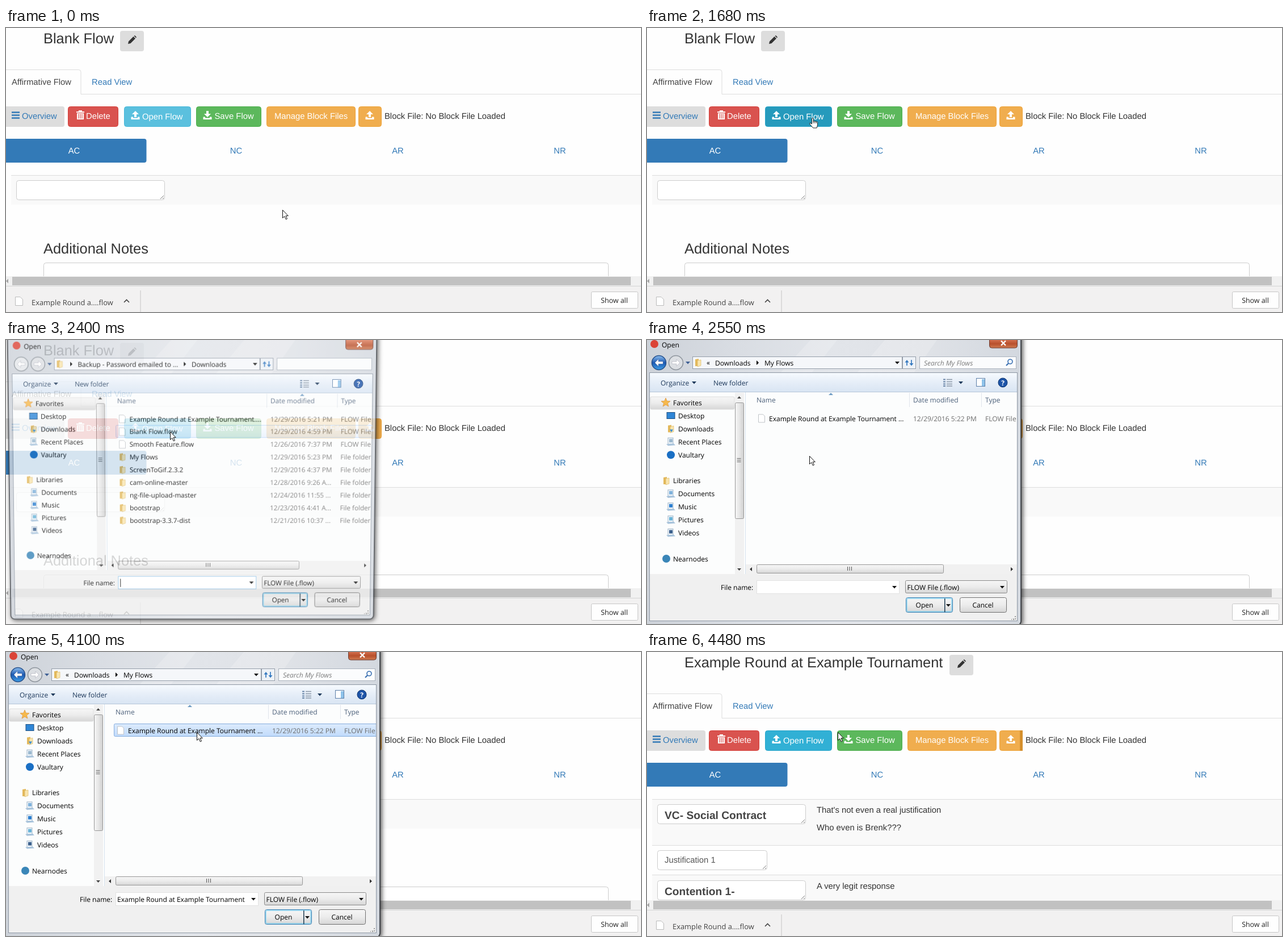
Recreate the animation shown at these times as an HTML page. Size 1119 px wide and 500 px high, loop 6.58 s.

```html
<!DOCTYPE html>
<html lang="en">
<head>
<meta charset="utf-8">
<title>Open Flow</title>
<style>
html, body { margin: 0; width: 100%; height: 100%; overflow: hidden; background: #fefefe; }
svg { position: absolute; left: 0; top: 0; overflow: visible; text-rendering: geometricPrecision; }
.page text { font-family: "Liberation Sans", Arial, sans-serif; font-size: 14.8px; }
.page .bar text, #dialog text { font-family: "Open Sans", "Noto Sans", sans-serif; }
#dialog text { font-size: 12px; }
#dialog { transform-origin: 329.5px 250px; filter: drop-shadow(2px 2px 4px rgba(0,0,0,.75)); }
</style>
</head>
<body>
<svg class="page" id="page" width="1119" height="500"></svg>
<svg id="dialog" width="1119" height="500"></svg>
<svg id="pointer" width="1119" height="500">
  <g id="cursor" stroke="#111" stroke-linejoin="round" fill="#fff">
    <path id="arrow" d="M0 0V14L3.3 11L5.8 16.4L8 15.4L5.6 10.2H9.8Z"/>
    <path id="hand" transform="scale(.92)" d="M1 1.5a1.5 1.5 0 0 1 3 0V7a1.4 1.4 0 0 1 2.8.3a1.4 1.4 0 0 1 2.8.5a1.3 1.3 0 0 1 2.4 1v4.5L10.5 19H3.5L-2.5 12q-1.5-2.8.8-2.7L1 11.5ZM4 7v3M6.8 7.5v2.5M9.6 8v2"/>
  </g>
</svg>
<script>
const LOOP = 6580;
const $ = id => document.getElementById(id);
const rect = (x, y, w, h, fill, more = '') =>
  `<rect x="${x}" y="${y}" width="${w}" height="${h}" fill="${fill}" ${more}/>`;
const path = (d, fill, more = '') => `<path d="${d}" fill="${fill}" ${more}/>`;
const line = (d, color, w = 1, more = '') =>
  path(d, 'none', `stroke="${color}" stroke-width="${w}" ${more}`);
const text = (x, y, s, fill = '#333', more = '') =>
  `<text x="${x}" y="${y}" fill="${fill}" ${more}>${s}</text>`;
const mid = 'text-anchor="middle"';
const at = (x, y, s) => `<g transform="translate(${x} ${y})">${s}</g>`;
const group = (id, s, more = '') => `<g id="${id}" ${more}>${s}</g>`;
const grad = (id, colors, dir = 'x2="0" y2="1"') =>
  `<linearGradient id="${id}" ${dir}>` + colors.map((c, i) =>
    `<stop offset="${i / (colors.length - 1)}" stop-color="${c}"/>`).join('') + '</linearGradient>';
const down = (x, y, c = '#111') => path(`M${x - 4} ${y - 2}h8l-4 4.5z`, c);

// ---------- web page ----------
const BLUE = '#337ab7';
const button = (x, w, fill, edge, id = '') =>
  rect(x + .5, 138.5, w - 1, 35, fill, `rx="4" stroke="${edge}" ${id && `id="${id}"`}`);
const tray = 'M-7.5 2.5H-4V4.5H4V2.5H7.5V7H-7.5Z';
const upload = (x, y) => at(x, y, path('M0-8L6-2H2V3H-2V-2H-6Z' + tray, '#fff'));
const download = (x, y) => at(x, y, path('M-2-8H2V-3H6L0 3L-6-3H-2Z' + tray, '#fff'));
const area = (x, y, w) => rect(x + .5, y + .5, w, 34, '#fff', 'rx="4" stroke="#ccc"') +
  line(`M${x + w - 7} ${y + 33}l6-6M${x + w - 3} ${y + 33}l2-2`, '#777');
const stripe = (y, h, fill) => rect(9, y, 1110, h, fill) + rect(9, y, 1110, 1, '#ddd');
const pencil = path('M-7 7L-6 2.5L2.5-6L6-2.5L-2.5 6ZM3.5-7L5-8L8-5L7-3.5Z', '#333');
const trash = path('M-7-6H-3V-8H3V-6H7V-4H-7ZM-6-3H6V8H-6Z', '#fff') +
  line('M-3-2V6.5M0-2V6.5M3-2V6.5', '#d9534f', 1.2);
const heading = 'style="font-size:25.4px"';
const bold = 'style="font-size:19.2px;font-weight:bold"';

const emptyFlow = stripe(259, 52, '#f9f9f9') + area(18, 268, 261) +
  text(66, 397, 'Additional Notes', '#333', heading) +
  rect(66.5, 413.5, 995, 60, '#fff', 'rx="4" stroke="#ccc"');
const loadedFlow = stripe(259, 81, '#f9f9f9') + stripe(340, 52, '#fefefe') + stripe(392, 60, '#f9f9f9') +
  area(18, 268, 261) + area(18, 349, 193) + area(18, 402, 261) +
  text(31, 294, 'VC- Social Contract', '#444', bold) +
  text(31, 371, 'Justification 1', '#555') +
  text(31, 428, 'Contention 1-', '#444', bold) +
  text(299, 283, "That's not even a real justification") +
  text(299, 314, 'Who even is Brenk???') +
  text(299, 417, 'A very legit response') +
  rect(657, 138, 5, 36, '#d58f2c');

$('page').innerHTML =
  text(66, 27, '', '#333', heading + ' id="title"') +
  group('edit', rect(201, 5, 42, 36, '#ddd', 'rx="4"') + at(222, 21, pencil)) +
  line('M-5 73.5H128a4 4 0 0 1 4 4V116.5H1119', '#ddd') +
  text(10, 100, 'Affirmative Flow', '#444') + text(151, 100, 'Read View', BLUE) +
  rect(-6, 138, 109, 36, '#ddd', 'rx="4"') +
  line('M10 148.5H24M10 153.5H24M10 158.5H24', BLUE, 2.4) + text(28, 160, 'Overview', BLUE) +
  button(109, 89, '#d9534f', '#d43f3a') + at(131, 153, trash) + text(141, 160, 'Delete', '#fff') +
  button(208, 118, '#5bc0de', '#46b8da', 'openFlow') + upload(228, 154) + text(240, 161, 'Open Flow', '#fff') +
  button(335, 115, '#5cb85c', '#4cae4c') + download(355, 154) + text(367.5, 160, 'Save Flow', '#fff') +
  button(459, 157, '#f0ad4e', '#eea236') + text(473, 160, 'Manage Block Files', '#fff') +
  button(621, 41, '#f0ad4e', '#eea236') + upload(641, 154) +
  text(667, 160, 'Block File: No Block File Loaded') +
  rect(-6, 195, 253.5, 42, BLUE, 'rx="4"') +
  rect(278, 195, 255, 42, '#eee', 'rx="4" id="ncHover"') +
  [['AC', 120, '#fff'], ['NC', 405.5, BLUE], ['AR', 690.5, BLUE], ['NR', 976, BLUE]]
    .map(([s, x, c]) => text(x, 221, s, c, mid + ` id="tab${s}"`)).join('') +
  group('empty', emptyFlow) + group('loaded', loadedFlow) +
  rect(0, 437, 1119, 17, '#f1f1f1') + rect(11, 438, 1090, 15, '#c1c1c1') +
  path('M0 445.5L4 441.5V449.5Z', '#a3a3a3') +
  rect(0, 454, 1119, 46, '#f2f1f1') + rect(0, 454, 1119, 1, '#d4d4d4') +
  path('M16.5 473.5H25L29.5 478V488.5H16.5Z', '#fff', 'stroke="#bbb"') +
  line('M208 483L212.5 478.5L217 483', '#444', 1.6) + rect(236.5, 462, 1, 38, '#c4c4c4') +
  rect(1031.5, 464.5, 82, 29, '#fefefe', 'rx="2" stroke="#c6c6c6"') +
  group('', text(45, 488, 'Example Round a....flow', '#444', 'style="font-size:12.9px"') +
    text(1072, 484, 'Show all', '#222', mid + ' style="font-size:12.4px"'), 'class="bar"');

// ---------- file dialog ----------
const INK = '#000', HEAD = '#4c607a', TOOL = '#1e395b';
const sheet = (x, y) => at(x, y, path('M-5.5-7H2.5L5.5-4V7H-5.5Z', '#fff', 'stroke="#c0c4c8"'));
const folder = (x, y) => at(x, y,
  path('M-5-6L1-7V6H-5Z', '#e3b95c') + path('M-1-4L5-5V5L-1 7Z', '#f9e5ae', 'stroke="#d9b45c" stroke-width=".6"'));
const place = (x, y, c) => at(x, y, rect(-5, -7, 9, 11, '#f4f8fc', 'stroke="#9db4c8"') +
  rect(-3, -5, 6, 6, c) + path('M-8 4L5 3L8 6L-5 7Z', '#a9c4dc'));
const dot = (x, y, c) => `<circle cx="${x}" cy="${y}" r="7" fill="${c}"/>`;
const star = path('M0-8L2.2-2.6L8-2.2L3.5 1.5L5 7L0 4L-5 7L-3.5 1.5L-8-2.2L-2.2-2.6Z', '#f6b94c', 'stroke="#d8903a" stroke-width=".7"');

const round = (x, fill, edge, flip) => at(x, 40,
  `<circle r="12.5" fill="${fill}" stroke="${edge}" stroke-width="1.5"/>` +
  path('M-7 0L-1-6V-2H7V2H-1V6Z', '#fff', `transform="scale(${flip} 1)" stroke="#99a" stroke-width=".5"`));
const crumb = x => path(`M${x} 36l4 4l-4 4z`, INK);
const thumb = (x, y, w, h, fill) => rect(x + .5, y + .5, w, h, `url(#${fill})`, 'rx="2" stroke="#979797"');

const sideItems = [['Desktop', '#2f86d6'], ['Downloads', '#3f8fd0'], ['Recent Places', '#9ab8cf'], ['Vaultary', 0],
  0, 0, ['Documents', '#7fb2dc'], ['Music', '#2c7fd0'], ['Pictures', '#69b4d8'], ['Videos', '#3a5f8c']];
const sidebar = rect(6, 100, 148, 22, 'url(#soft)', 'rx="2" stroke="#dcdcdc"') +
  at(33, 110, star) + text(46, 115, 'Favorites', INK) +
  sideItems.map((it, i) => {
    if (!it) return '';
    const y = 133.5 + i * 22.9;
    const icon = i == 0 ? rect(35, y - 6, 14, 11, it[1], 'stroke="#1d4f80"')
      : i == 1 ? folder(42, y) + path(`M40 ${y + 1}h6l-3 5z`, it[1])
      : i == 3 ? dot(42, y, '#1a6fc4') : place(42, y, it[1]);
    return icon + text(55, y + 4.5, it[0], INK);
  }).join('') +
  folder(34, 248) + text(46, 252, 'Libraries', INK) + dot(34, 385, '#3a86b8') + text(46, 389.5, 'Nearnodes', INK);
const sideBar = rect(155, 93, 16, 319, '#f1f1f1') + thumb(155, 110, 15, 204, 'across') +
  path('M159 103h7l-3.5-4zM159 402h7l-3.5 4z', '#444') + line('M158.5 208.5h7M158.5 211.5h7M158.5 214.5h7', '#666') +
  rect(173, 92, 1, 320, '#d6e2ee');

const listHead = sortX => text(193, 110, 'Name', HEAD) + text(469, 110, 'Date modified', HEAD) +
  text(596, 110, 'Type', HEAD) + rect(462, 93, 1, 25, '#dfe5ec') + rect(589, 93, 1, 25, '#dfe5ec') +
  path(`M${sortX - 4} 97l4-4l4 4z`, '#6f9cc4');
const rowMark = (y, more) => rect(190.5, y - 11.5, 470, 22, 'url(#over)', 'rx="2" clip-path="url(#list)" stroke="#b8d6fb" ' + more);
const fileRow = (i, name, date, type) => {
  const y = 138 + i * 22.95;
  return (type == 'FLOW File' ? sheet : folder)(202, y) + text(215, y + 4.5, name, INK) +
    text(469, y + 4.5, date, '#6d6d6d') + text(596, y + 4.5, type, '#6d6d6d');
};
const downloads = [
  ['Example Round at Example Tournament....', '12/29/2016 5:21 PM'], ['Blank Flow.flow', '12/29/2016 4:59 PM'],
  ['Smooth Feature.flow', '12/26/2016 7:37 PM'], ['My Flows', '12/29/2016 5:23 PM'],
  ['ScreenToGif.2.3.2', '12/29/2016 4:37 PM'], ['cam-online-master', '12/28/2016 9:26 A...'],
  ['ng-file-upload-master', '12/24/2016 11:55 ...'], ['bootstrap', '12/23/2016 4:41 A...'],
  ['bootstrap-3.3.7-dist', '12/21/2016 10:37 ...']
].map((r, i) => fileRow(i, ...r, i < 3 ? 'FLOW File' : 'File folder')).join('');

const downloadsView = round(21, '#e4e7ea', '#8d949c', 1) + crumb(109) +
  text(122.5, 44.5, 'Backup - Password emailed to ...', INK) + crumb(313) + text(327, 44.5, 'Downloads', INK) +
  listHead(526) + rowMark(161) + group('', downloads, 'clip-path="url(#list)"') +
  rect(193.5, 423.5, 251, 23, '#fff', 'stroke="#8fc3e8"') + rect(197, 428, 1, 15, '#000');
const flowsView = round(21, 'url(#ball)', '#27518c', 1) + text(105, 43.5, '«', INK) + text(120, 44.5, 'Downloads', INK) +
  crumb(193) + text(207, 44.5, 'My Flows', INK) +
  text(488, 44.5, 'Search My Flows', '#7d7d7d', 'font-style="italic"') +
  line('M633 45l4-4', '#3a6fb0', 2.2) + '<circle cx="640" cy="38" r="4" fill="#eef6ff" stroke="#3a6fb0" stroke-width="1.6"/>' +
  listHead(324) + rowMark(138, 'id="rowMark"') +
  group('', fileRow(0, 'Example Round at Example Tournament ...', '12/29/2016 5:22 PM', 'FLOW File'), 'clip-path="url(#list)"') +
  rect(193.5, 423.5, 251, 23, '#fff', 'stroke="#e2e2e2"') +
  text(196, 440, 'Example Round at Example Tournament', INK, 'id="fileName"');

const chrome =
  rect(-3, -14, 662, 516, 'url(#glass)', 'rx="7" stroke="#2c3036" stroke-width="1.6"') +
  path('M300-13H345L290 58H235ZM430-13H520L470 58H370Z', '#fff', 'opacity=".18"') +
  dot(13, 7, '#db4437') + text(26, 13, 'Open', INK) +
  rect(603.5, -8, 49, 22, 'url(#close)', 'rx="4" stroke="#6b3b32"') +
  line('M624 1.5L632 9.5M632 1.5L624 9.5', '#fff', 2.4) +
  rect(4.5, 57.5, 648, 437, '#f0f0f0', 'stroke="#8d97a4"') + rect(5, 92, 647, 320, '#fcfdfd');
const body =
  round(51, '#dcdfe3', '#8d949c', -1) + down(72, 40, '#3e5f94') +
  rect(80.5, 29.5, 369, 21, '#f5f7fa', 'stroke="#949da9"') + rect(450.5, 29.5, 23, 21, '#eef2f7', 'stroke="#949da9"') +
  folder(90, 40) + down(441, 40) +
  line('M458 45V38M466 35V42', '#3579c0', 1.7) + path('M454.5 39.5h7l-3.5-4.5zM462.5 41h7l-3.5 4.5z', '#3579c0') +
  rect(480.5, 29.5, 170, 21, '#fbfcfd', 'stroke="#aab2bd"') +
  rect(5, 58, 647, 33, 'url(#tool)') + rect(5, 91, 647, 1, '#b5c5d8') +
  text(24, 79.5, 'Organize', TOOL) + down(83, 75, TOOL) + text(117, 79.5, 'New folder', TOOL) +
  line('M522 69.5h4M522 73.5h4M522 77.5h4M522 81h4', '#6a86a8', 2) + line('M528 69.5h10M528 73.5h10M528 77.5h10M528 81h10', '#8a97a6', 1.4) +
  down(553, 75, TOOL) + rect(580.5, 67.5, 15, 14, '#fff', 'stroke="#5c7fa8"') + rect(590, 69, 5, 12, '#8ec2ea') +
  '<circle cx="627" cy="75" r="8" fill="#1d54a8" stroke="#0e356f"/>' + text(627, 79.5, '?', '#fff', mid + ' font-weight="bold"') +
  sidebar + rect(174, 395, 478, 17, '#f1f1f1') + thumb(193, 395, 329, 15, 'soft') +
  line('M353.5 399v7M357 399v7M360.5 399v7', '#555') + path('M185 400v7l-4-3.5zM641 400v7l4-3.5z', '#333') +
  text(130, 440, 'File name:', INK) + group('downloads', downloadsView) + group('flows', flowsView) + down(436, 435) +
  rect(455.5, 423.5, 179, 22, 'url(#soft)', 'rx="2" stroke="#8a8a8a"') + text(458.5, 440, 'FLOW File (.flow)', INK) + down(626, 435) +
  rect(456.5, 453.5, 82, 26, 'url(#soft)', 'rx="3" stroke="#3c7fb1"') +
  rect(458, 455, 79, 23, 'none', 'id="glow" rx="2" stroke="#6fcbf0" stroke-width="1.5"') +
  rect(524, 455, 1.5, 24, '#1f3b50') + text(489, 471, 'Open', INK, mid) + down(531, 467) +
  rect(551.5, 453.5, 82, 26, 'url(#soft)', 'rx="3" stroke="#707070"') + text(592, 471, 'Cancel', INK, mid) +
  line('M649 486v6h-7M646 491h-1', '#999', 2, 'stroke-dasharray="2 2"');

$('dialog').innerHTML = '<defs>' +
  grad('glass', ['#cdd2d9', '#d9dde3', '#e2e5ea', '#dfe2e7', '#d3d8df'], '') +
  grad('close', ['#e7a68f', '#d5714f', '#b8502c', '#d07a50']) +
  grad('tool', ['#f6fafe', '#e6eef8', '#d9e5f3']) + grad('soft', ['#f6f6f6', '#ececec', '#d6d6d6']) +
  grad('across', ['#f6f6f6', '#e6e6e6', '#cfcfcf'], '') + grad('ball', ['#8fc0f0', '#1d58b0', '#3fa0e8']) +
  grad('pick', ['#dcebfc', '#c1dbfc']) + grad('over', ['#f8fbff', '#e8f1fd']) +
  '<clipPath id="list"><rect x="174" y="92" width="478" height="303"/></clipPath></defs>' +
  chrome + sideBar + group('body', body);

// ---------- time line ----------
const ticks = [0, 450, 530, 610, 690, 840, 910, 990, 1070, 1140, 1220, 1300, 1370, 1450, 1680, 1840,
  2220, 2330, 2400, 2470, 2550, 2780, 2860, 3240, 3320, 3400, 3480, 3560, 3640, 3710, 3790, 3870,
  3930, 4010, 4100, 4170, 4250, 4330, 4400, 4480];
const moves = [[0, 487, 320], [450, 474, 310], [690, 358, 236], [990, 335, 208], [1220, 304, 174], [1450, 289, 158],
  [1680, 289, 158], [1840, 289, 161], [2400, 289, 161], [2550, 286, 204], [2860, 286, 204], [3240, 284, 200], [3870, 336, 141]];
const tilt = [[2220, 1], [2330, .6], [2400, .34], [2470, .12], [2550, 0], [4170, 0], [4400, 1.1]];

function sample(keys, t) {
  const i = keys.findIndex(k => k[0] > t);
  if (i < 0) return keys[keys.length - 1].slice(1);
  if (!i) return keys[0].slice(1);
  const a = keys[i - 1], b = keys[i], f = (t - a[0]) / (b[0] - a[0]);
  return a.slice(1).map((v, j) => v + (b[j + 1] - v) * f);
}
const set = (id, attrs) => { for (const k in attrs) $(id).setAttribute(k, attrs[k]); };
const show = (id, on) => { $(id).style.display = on ? '' : 'none'; };
const inside = (x, y, l, t, r, b) => x >= l && x <= r && y >= t && y <= b;

function draw(time) {
  const t = ticks.filter(v => v <= time).pop();
  const [x, y] = sample(moves, t);
  const overTab = t < 2000 && inside(x, y, 278, 195, 533, 237);
  const overOpen = t < 2000 && inside(x, y, 208, 138, 326, 174);
  const hand = t < 1840 && (overTab || overOpen);
  set('cursor', { transform: `translate(${x + .5} ${y + .5})` });
  show('hand', hand);
  show('arrow', !hand);

  const done = t >= 4480, pressed = t == 1680, active = overOpen || t >= 1840;
  $('title').textContent = done ? 'Example Round at Example Tournament' : 'Blank Flow';
  set('edit', { transform: `translate(${done ? 332 : 0} 0)` });
  show('empty', !done);
  show('loaded', done);
  show('ncHover', overTab);
  set('tabNC', { fill: overTab ? '#23527c' : BLUE });
  set('openFlow', { fill: pressed ? '#269abc' : active ? '#31b0d5' : '#5bc0de', stroke: active ? '#2aa5c9' : '#46b8da' });

  const open = t >= 2220 && !done;
  show('dialog', open);
  if (!open) return;
  const [q] = sample(tilt, t), css = $('dialog').style;
  css.opacity = 1 - .78 * q ** 1.3;
  css.transform = q ? `translateY(${-5 * q}px) perspective(1000px) rotateX(${-6.2 * q}deg) scale(${1 - .077 * q})` : 'none';
  show('body', t > 2220);
  show('downloads', t < 2550);
  show('flows', t >= 2550);
  const picked = t >= 3930;
  show('rowMark', picked || inside(x, y, 190, 126, 652, 149));
  set('rowMark', { fill: picked ? 'url(#pick)' : 'url(#over)', stroke: picked ? '#84acdd' : '#b8d6fb' });
  show('fileName', picked);
  set('glow', { opacity: t == 2780 ? .4 : t == 2860 ? .6 : .8 });
}

const start = performance.now();
function tick() {
  draw((performance.now() - start) % LOOP);
  requestAnimationFrame(tick);
}
tick();
</script>
</body>
</html>
```
